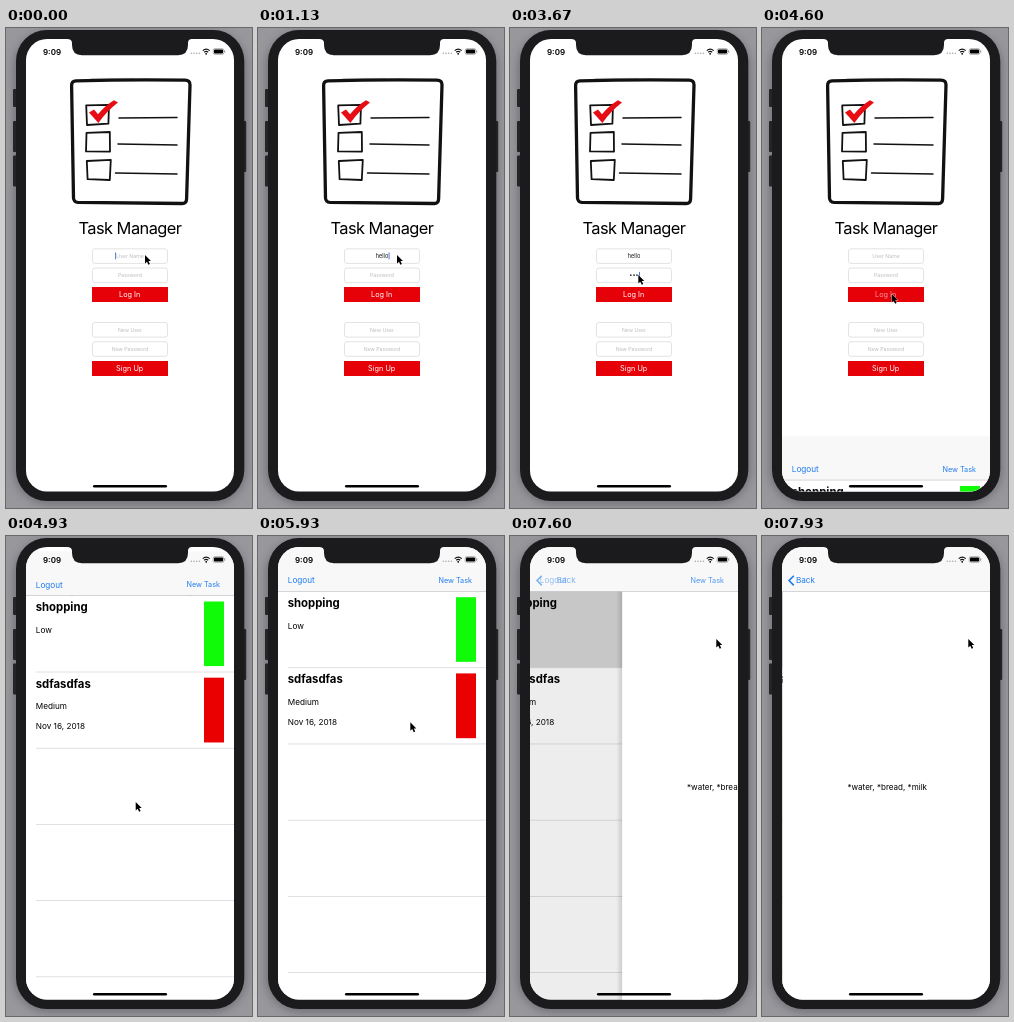
Write an HTML page that moves like this. It is 246x480 px and loops after 8 s.

```html
<!DOCTYPE html>
<html lang="en">
<head>
<meta charset="utf-8">
<title>Task Manager</title>
<style>
  html, body { margin: 0; width: 100%; height: 100%; overflow: hidden; background: #98979c; }
  svg { display: block; width: 100vw; height: 100vh; }
  text { font-family: Inter, Roboto, sans-serif; font-size: 8.2px; }
  .mid { text-anchor: middle; }
  .hint { font-size: 5.2px; fill: #bcbcc0; }
  .value { font-size: 5.5px; fill: #111; }
  .button { font-size: 7.3px; fill: #fff; }
  .head { font-size: 11.35px; font-weight: 700; }
  .link { fill: #1f7cee; }
</style>
</head>
<body>
<svg id="stage" viewBox="0 0 246 480"></svg>
<script>
const LOOP = 8000, TICK = 1000 / 15;
const SCREEN = { x: 20, y: 11, w: 208, h: 452.5 };

const rect = (x, y, w, h, fill, extra = '') =>
  `<rect x="${x}" y="${y}" width="${w}" height="${h}" fill="${fill}" ${extra}/>`;
const text = (x, y, str, cls = '', extra = '') =>
  `<text x="${x}" y="${y}" class="${cls}" ${extra}>${str}</text>`;
const path = (d, width, extra = '') =>
  `<path d="${d}" fill="none" stroke="#111" stroke-width="${width}" stroke-linejoin="round" stroke-linecap="round" ${extra}/>`;

const field = (y, hint, id) =>
  rect(86.5, y, 75, 14.6, '#fff', 'rx="2.5" stroke="#dcdcde" stroke-width=".8"') +
  text(124, y + 9.3, hint, 'hint mid', `id="${id}Hint"`) +
  text(124, y + 9.4, '', 'value mid', `id="${id}Value"`);
const button = (y, label, id) =>
  rect(86, y, 76, 15, '#e60008') + text(123.7, y + 10.2, label, 'button mid', `id="${id}"`);

const clipboard =
  path('M85 50.4 H128', .5, 'opacity=".35"') +
  path('M70 52.8 Q125 51.4 179 52.2 Q184.3 52.3 184 57 L180.6 171 Q180.4 175.6 176 175.5 L72 174.4 Q67.8 174.2 67.5 170 L65.6 57.5 Q65.5 53 70 52.8Z', 3.3) +
  path('M80.2 77.4 L103 76.8 L102.4 95.6 L81 97Z M80.5 104.8 L103.8 104 L104 123.6 L80 123.4Z M80.8 133 L104.8 131.8 L103.8 152 L81.6 151.2Z', 1.8) +
  path('M113 90 L171 89.6 M112 116 L171 117 M109.5 145 L171 146', 1.5) +
  '<path d="M83 84.6 L88 81.6 L92 86.2 Q99 77.5 108 72.2 L112 74.6 Q101 83 92.4 95Z" fill="#e60d14"/>';

const login =
  rect(20, 11, 208, 453, '#fff') + clipboard +
  text(124, 206.2, 'Task Manager', 'mid', 'style="font-size:16.4px;letter-spacing:-.55px"') +
  field(220.8, 'User Name', 'user') + field(240, 'Password', 'pass') +
  button(259, 'Log In', 'logIn') +
  field(294.5, 'New User', 'newUser') + field(313.7, 'New Password', 'newPass') +
  button(333, 'Sign Up', 'signUp') +
  rect(0, 0, .9, 7, '#4468d8', 'id="caret"');

const lines = [0, 1, 2, 3, 4].map(i =>
  rect(30, 131.4 + i * 76.2, 198, .7, '#d4d4d7')).join('');
const list =
  rect(20, 55, 208, 409, '#fff') +
  rect(20, 55.4, 208, 76.2, '#d6d6d6', 'id="selected"') + lines +
  text(29.7, 71.2, 'shopping', 'head') + text(29.8, 92.6, 'Low') +
  rect(198, 61.2, 20, 64.6, '#10fb08', 'id="low"') +
  text(29.7, 147.4, 'sdfasdfas', 'head') + text(29.8, 168.7, 'Medium') +
  text(29.8, 189.2, 'Nov 16, 2018') +
  rect(198, 137.4, 20, 64.8, '#ea0000');

const detail =
  rect(14, 55, 6, 409, 'url(#edge)') + rect(20, 55, 208, 409, '#fff') +
  text(124.6, 254, '*water, *bread, *milk', 'mid', 'style="font-size:8.05px"');

const navBar =
  rect(20, 11, 208, 44.3, '#f8f8f8') + rect(20, 55, 208, .6, '#bdbdc0') +
  text(29.8, 47.4, 'Logout', 'link', 'id="logout"') +
  text(214, 47.2, 'New Task', 'link', 'id="newTask" text-anchor="end" style="font-size:7.25px"') +
  '<path id="chevron" d="M31.8 39.8 L27 44.6 L31.8 49.4" fill="none" stroke="#1f7cee" stroke-width="1.6"/>' +
  text(33.8, 47.4, 'Back', 'link', 'id="back"');

const statusBar =
  text(37, 26.6, '9:09', '', 'style="font-size:8px;font-weight:600"') +
  [0, 1, 2, 3].map(i => `<circle cx="${185.3 + i * 2.7}" cy="25.2" r=".8" fill="#aaa"/>`).join('') +
  path('M196.7 22.6 Q200.2 19.6 203.7 22.6 M198.2 24.3 Q200.2 22.6 202.2 24.3', 1.2, 'style="stroke-linecap:butt"') +
  '<circle cx="200.2" cy="25.8" r=".9"/>' +
  rect(207.2, 20.7, 10.6, 5.6, 'none', 'rx="1.6" stroke="#777" stroke-width=".6"') +
  rect(208, 21.5, 9, 4, '#000', 'rx=".9"') + rect(218.4, 22.4, .8, 2.2, '#777');

const phone =
  rect(0, 0, 246, 480, '#98979c') +
  rect(8, 4, 232, 472, '#4a4a50', 'rx="34" opacity=".5" filter="url(#soft)"') +
  [[7, 61, 18], [7, 93, 31], [7, 127.5, 31], [235, 93, 51]].map(([x, y, h]) =>
    rect(x, y, 5.2, h, '#242426', 'rx="1"')).join('') +
  rect(10, 2, 228.3, 471, '#1b1b1d', 'rx="31"');

const notch = '<path d="M61 10 H186 V11 Q182 11 182 15 V17 Q182 27.2 172 27.2 H76 Q66 27.2 66 17 V15 Q66 11 61 11Z" fill="#1b1b1d"/>';
const pointer = '<path id="cursor" d="M0 0 V8.4 L2 6.7 L3.4 9.8 L4.9 9.1 L3.5 6.1 H6Z" stroke="#fff" stroke-width=".7" paint-order="stroke"/>';

document.getElementById('stage').innerHTML = `
  <defs>
    <clipPath id="screen">${rect(SCREEN.x, SCREEN.y, SCREEN.w, SCREEN.h, '#000', 'rx="21"')}</clipPath>
    <linearGradient id="edge">
      <stop offset="0" stop-opacity="0"/><stop offset="1" stop-opacity=".14"/>
    </linearGradient>
    <filter id="soft"><feGaussianBlur stdDeviation="4"/></filter>
  </defs>
  ${phone}
  <g clip-path="url(#screen)">
    ${login}
    <g id="tasks">
      <g id="list">${list}</g>
      ${rect(20, 55, 208, 409, '#000', 'id="dim"')}
      <g id="detail">${detail}</g>
      ${navBar}
    </g>
    ${statusBar}
    ${rect(87, 457, 74, 2.5, '#000', 'rx="1.25"')}
  </g>
  ${notch}${pointer}`;

const ui = {};
document.querySelectorAll('#stage [id]').forEach(e => ui[e.id] = e);

const move = (e, x, y) => e.setAttribute('transform', `translate(${x.toFixed(2)} ${y.toFixed(2)})`);
const alpha = (e, a) => e.setAttribute('opacity', a);
const show = (e, on) => e.setAttribute('visibility', on ? 'inherit' : 'hidden');
const countPast = (times, t) => times.filter(k => t >= k - 5).length;

// Critically damped spring, 0 to 1
const spring = (t, start) => {
  const u = Math.max(0, t - start) * .0183;
  return 1 - (1 + u) * Math.exp(-u);
};

const route = [
  [0, 139, 227], [1670, 139, 227], [2070, 128.3, 246.5], [3600, 128.3, 246.5],
  [4330, 129.7, 266], [4930, 129.7, 266], [5270, 150, 190], [5830, 150, 190],
  [6670, 206, 102], [6800, 206.3, 103], [LOOP, 206.3, 103]
];
function along(t) {
  const i = Math.max(1, route.findIndex(k => k[0] >= t));
  const [t0, x0, y0] = route[i - 1], [t1, x1, y1] = route[i];
  const p = (t - t0) / (t1 - t0), e = p * p * (3 - 2 * p);
  return [x0 + (x1 - x0) * e, y0 + (y1 - y0) * e];
}

const userKeys = [330, 470, 600, 670, 800], passKeys = [2930, 3000, 3130];
const CLEAR = 4400, FOCUS_PASS = 2270, SELECT = 7460;

function setField(id, str) {
  ui[id + 'Value'].textContent = str;
  show(ui[id + 'Hint'], !str);
}

function render(t) {
  const open = t < CLEAR;
  const user = open ? 'hello'.slice(0, countPast(userKeys, t)) : '';
  const pass = open ? '•'.repeat(countPast(passKeys, t)) : '';
  setField('user', user);
  setField('pass', pass);

  const inPass = t >= FOCUS_PASS - 5;
  const value = inPass ? ui.passValue : ui.userValue;
  const caretX = value.textContent
    ? 124.4 + value.getComputedTextLength() / 2
    : inPass ? 111.3 : 109.2;
  move(ui.caret, caretX, inPass ? 243.9 : 224.4);
  show(ui.caret, open);
  alpha(ui.logIn, t > 4325 && t < 4700 ? .6 : 1);

  const rise = spring(t, 4567);
  move(ui.tasks, 0, (1 - rise) * SCREEN.h);

  const push = spring(t, 7498), rest = 1 - push;
  const chosen = t >= SELECT;
  move(ui.list, -.3 * SCREEN.w * push, 0);
  move(ui.detail, SCREEN.w * rest, 0);
  move(ui.back, 29 * rest, 0);
  show(ui.detail, push > 0);
  show(ui.selected, chosen);
  show(ui.low, !chosen);
  alpha(ui.dim, .13 * push);
  alpha(ui.logout, rest);
  alpha(ui.newTask, Math.min(1, 1.8 * rest));
  alpha(ui.back, push);
  alpha(ui.chevron, push);

  move(ui.cursor, ...along(t));
}

function frame(now) {
  const t = now % LOOP;
  render(Math.floor((t + 5) / TICK) * TICK);
  requestAnimationFrame(frame);
}
render(0);
requestAnimationFrame(frame);
</script>
</body>
</html>
```
